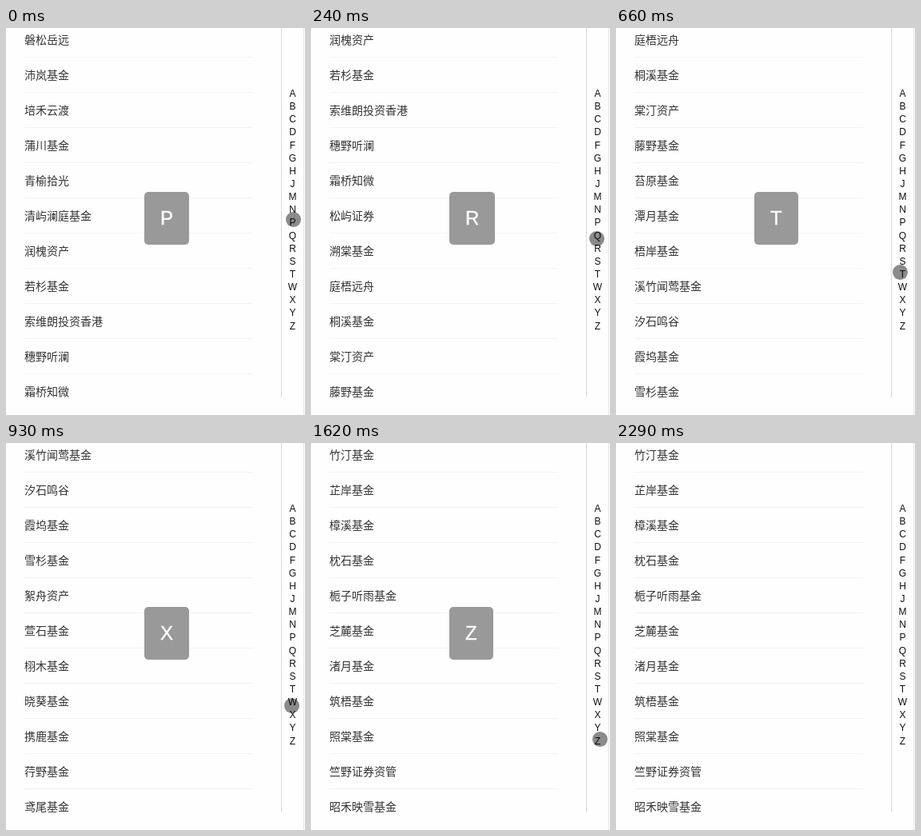
An HTML page for the animation above (2560 ms loop, 374 by 484 pixels).

```html
<!DOCTYPE html>
<html lang="zh-CN">
<head>
<meta charset="utf-8">
<title>字母索引列表</title>
<style>
  html, body { margin: 0; width: 100%; height: 100%; overflow: hidden; }
  body { position: relative; background: #fefefe; color: #333; }
  .list {
    position: absolute; left: 0; top: 0; width: 344px; height: 462px;
    overflow: hidden; border-right: 1px solid #d8d8d8;
  }
  .rows { position: absolute; left: 23px; top: -7px; width: 286px; }
  .row {
    height: 43px; line-height: 43px; border-bottom: 1px solid #f3f3f3;
    font-size: 14px; white-space: nowrap;
    font-family: "Noto Sans CJK SC", "Noto Sans CJK", "Noto Sans SC", sans-serif;
  }
  .edge { position: absolute; left: 372px; top: 0; width: 1px; height: 100%; background: #e4e4e4; }
  .index span {
    position: absolute; left: 348px; width: 21px; height: 16px; color: #111;
    font: 12px/16px "Liberation Sans", Arial, sans-serif; text-align: center;
  }
  .tip {
    position: absolute; left: 173px; top: 205px; height: 66px; padding: 0 20px;
    border-radius: 5px; background: #999; color: #fff;
    font: 24px/66px "Liberation Sans", Arial, sans-serif;
    -webkit-text-stroke: .4px #fff;
  }
  .touch {
    position: absolute; left: -10px; top: -10px; width: 19px; height: 19px;
    border-radius: 50%; background: rgba(0, 0, 0, .45);
  }
</style>
</head>
<body>
<div class="list"><div class="rows"></div></div>
<div class="edge"></div>
<div class="index"></div>
<div class="tip"></div>
<div class="touch"></div>
<script>
const LOOP = 2560, ROW = 44, PITCH = 16.14;

const sections = {
  P: "磐松岳远 沛岚基金 培禾云渡 蒲川基金",
  Q: "青榆拾光 清屿澜庭基金",
  R: "润槐资产 若杉基金",
  S: "索维朗投资香港 穗野听澜 霜桥知微 松屿证券 溯棠基金",
  T: "庭梧远舟 桐溪基金 棠汀资产 藤野基金 苔原基金 潭月基金",
  W: "梧岸基金",
  X: "溪竹闻莺基金 汐石鸣谷 霞坞基金 雪杉基金 絮舟资产 萱石基金 栩木基金 晓葵基金 携鹿基金 荇野基金",
  Y: "鸢尾基金 雁南洲 榆棠基金 砚溪基金 雨杉基金 云麓清禾 芸窗基金",
  Z: "竹汀基金 芷岸基金 樟溪基金 枕石基金 栀子听雨基金 芝麓基金 渚月基金 筑梧基金 照棠基金 竺野证券资管 昭禾映雪基金"
};

// time, touch x, touch y, section, pressed
const steps = [
  [0, 360, 240, "P", true],
  [120, 359, 252, "Q", true],
  [240, 358, 264, "R", true],
  [390, 357, 279, "S", true],
  [510, 357, 293, "S", true],
  [660, 356, 306, "T", true],
  [780, 357, 318, "W", true],
  [930, 358, 329, "X", true],
  [1050, 358, 341, "X", true],
  [1200, 359, 353, "Y", true],
  [1350, 360, 360, "Z", true],
  [1470, 361, 366, "Z", true],
  [1620, 362, 371, "Z", true],
  [1740, 363, 374, "Z", false],
  [1890, 363, 380, "Z", false],
  [2170, 331, 445, "Z", false],
  [2290, -50, -50, "Z", false]
];

const $ = selector => document.querySelector(selector);
const add = (parent, tag, text) => {
  const el = parent.appendChild(document.createElement(tag));
  el.textContent = text;
  return el;
};

const rows = $(".rows"), tip = $(".tip"), touch = $(".touch");
const firstRow = {};
for (const [letter, names] of Object.entries(sections)) {
  firstRow[letter] = rows.children.length;
  for (const name of names.split(" ")) add(rows, "div", name).className = "row";
}

[..."ABCDFGHJMNPQRSTWXYZ"].forEach((letter, i) => {
  add($(".index"), "span", letter).style.top = Math.round(74 + PITCH * i) + "px";
});

let shown;
function show(step) {
  if (step === shown) return;
  shown = step;
  const [, x, y, letter, pressed] = step;
  rows.style.transform = `translateY(${-ROW * firstRow[letter]}px)`;
  tip.textContent = letter;
  tip.style.display = pressed ? "block" : "none";
  touch.style.transform = `translate(${x}px, ${y}px)`;
  touch.style.opacity = pressed ? 1 : .7;
}

const start = performance.now();
function tick() {
  const t = (performance.now() - start) % LOOP;
  show(steps.findLast(step => step[0] <= t));
  requestAnimationFrame(tick);
}
tick();
</script>
</body>
</html>
```
